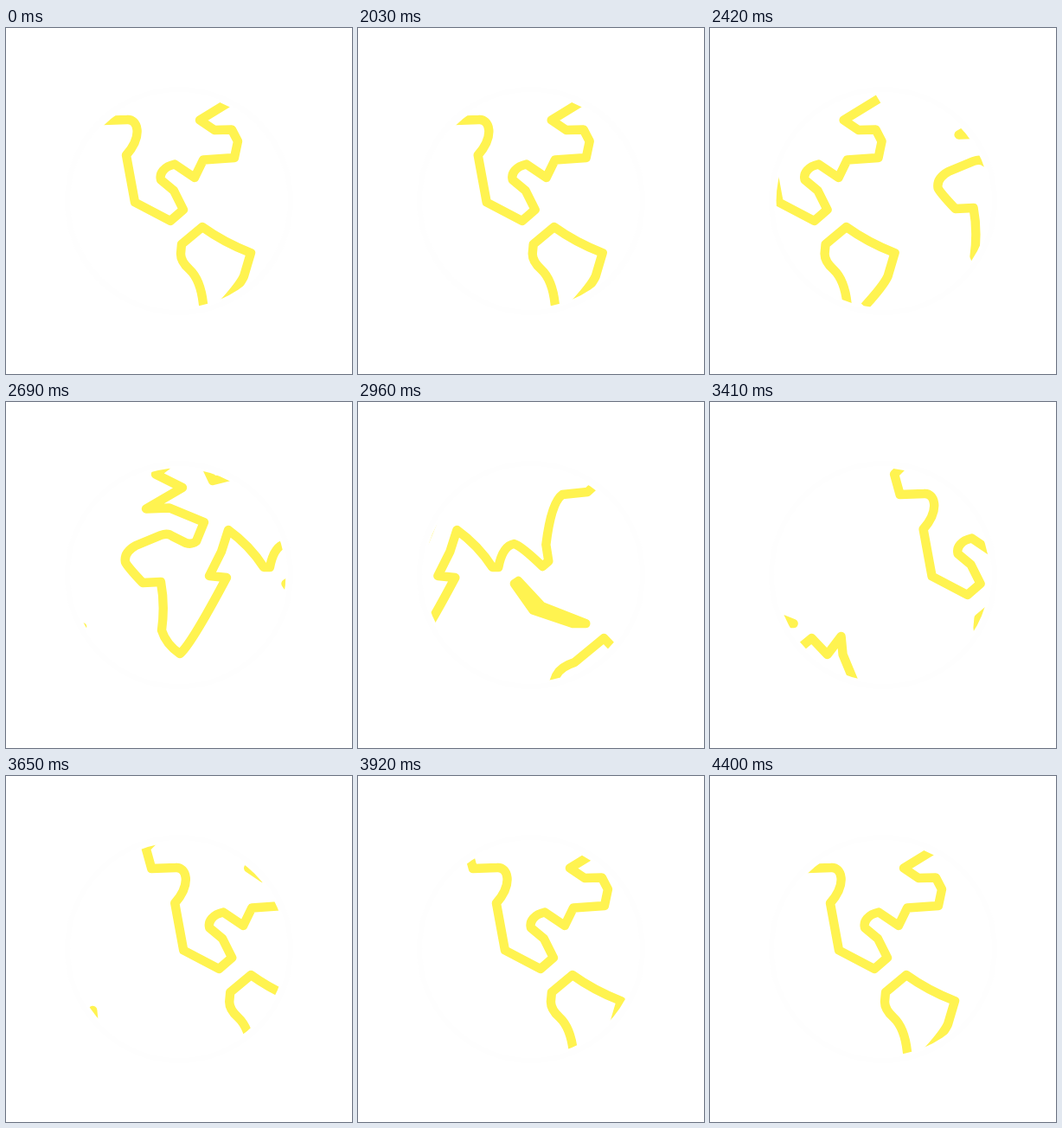
An HTML page that plays this animation: 400 px wide and 400 px high, repeating every 4.46 s.

```html
<!DOCTYPE html>
<html lang="en">
<head>
<meta charset="utf-8">
<title>Turning globe</title>
<style>
  html, body { margin: 0; width: 100%; height: 100%; overflow: hidden; background: #fff; }
  svg { display: block; width: 100%; height: 100%; }
  #rim { fill: none; stroke: #fefefe; stroke-width: 6; }
  #map { fill: none; stroke: #fff350; stroke-width: 10.4; stroke-linejoin: round; }
</style>
</head>
<body>
<svg viewBox="0 0 400 400">
  <defs>
    <clipPath id="disc"><circle cx="200" cy="200" r="123.4"/></clipPath>
    <g id="land">
      <!-- North America -->
      <path d="M119 70 L105.500 83.500 L112 107 L140 106 C152 105 159 124 139 147 L149 201.500 L190 223 L205 210 L194 188 L179 175.500 C177 168 183 160 195 157.500 L218 173 L228 152.500 L264 150 L268 131 L261 117.500 L241 118 L224 106.500 L264 82"/>
      <!-- South America -->
      <path d="M232 338 L228 319 Q225 291 212 279 Q202 270 202 261 L203 250 L227 230 Q252 248 283 260 L275 287 Q270 298 248 322"/>
      <!-- Europe, Africa and Asia -->
      <g transform="translate(196)">
        <path d="M192 68 L172 83.500 L203 99 L161 123.500 L188 122.500 L228 139 L219 161 Q214 165 207 163 L191 155 Q186 151 178 154 L149 166 Q135 174 137 185 Q139 190 157 209 L178 208 Q183 235 179 264 Q184 280 200 291 Q212 282 254 203 L234 201 L248 173 L256 148 Q281 166 297 191 L304 191 C306 181 311 166 322 164 Q330 166 355 190 L362 184 L359 165 Q365 116 378 107 L407 104 L419 93"/>
        <path d="M230 74 L238 91 L266 84"/>
      </g>
      <!-- Islands and Australia -->
      <g transform="translate(338)">
        <path d="M180.500 210 L185 207 L212 236 L263 256 L248 256 L202 240.500 Z"/>
        <path d="M222 334 L229 316 Q234 306 250 301 L284 273 L302 292 L318 271 L320 292 L337 333"/>
      </g>
    </g>
  </defs>
  <circle id="rim" cx="200" cy="200" r="129"/>
  <g clip-path="url(#disc)">
    <g id="map">
      <use href="#land"/>
      <use href="#land" x="612"/>
    </g>
  </g>
</svg>
<script>
  const LOOP = 4460, HOLD = 2030, STEP = 30, STEPS = 80, WIDTH = 612;
  const map = document.getElementById('map');

  // cubic-bezier(.335, 0, .328, 1)
  function ease(x) {
    if (x <= 0 || x >= 1) return x <= 0 ? 0 : 1;
    let lo = 0, hi = 1, u;
    for (let i = 0; i < 30; i++) {
      u = (lo + hi) / 2;
      const v = 1 - u;
      const bx = 3 * v * v * u * 0.335 + 3 * v * u * u * 0.328 + u * u * u;
      if (bx < x) lo = u; else hi = u;
    }
    return u * u * (3 - 2 * u);
  }

  function draw(ms) {
    const t = ms % LOOP;
    const k = t < HOLD ? 0 : Math.min(STEPS, Math.floor((t - HOLD) / STEP) + 1);
    map.setAttribute('transform', `translate(${-WIDTH * ease(k / STEPS)})`);
  }

  const start = performance.now();
  function tick() {
    draw(performance.now() - start);
    requestAnimationFrame(tick);
  }
  tick();
</script>
</body>
</html>
```
